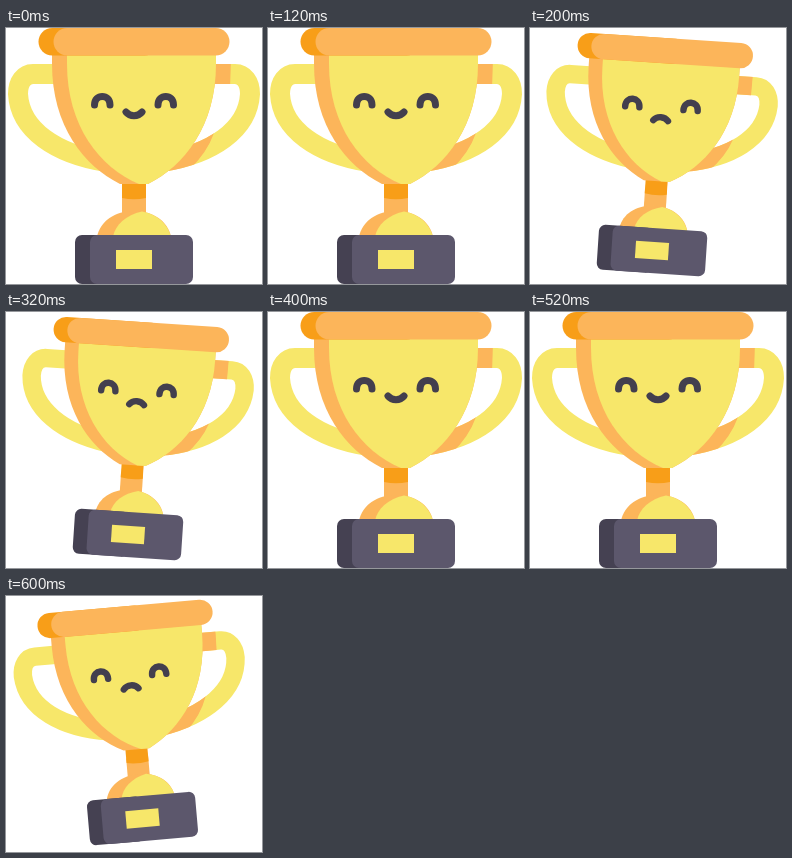
An HTML page for the animation above (0.8 s loop, 256 px wide and 256 px high).

```html
<!DOCTYPE html>
<html lang="en">
<head>
<meta charset="utf-8">
<title>Trophy</title>
<style>
  html, body { margin: 0; width: 100%; height: 100%; overflow: hidden; background: #fff; }
  svg { display: block; width: 100vw; height: 100vh; }
  .yellow { fill: #f7e76a; }
  .orange { fill: #fcb55a; }
  .amber { fill: #f89e18; }
  .slate { fill: #5c576c; }
  .dark { fill: #454152; }
  .handle { fill: none; stroke: #f7e76a; stroke-width: 20; }
  .shade { stroke: #fcb55a; }
  .face { fill: none; stroke: #433f4e; stroke-width: 7; stroke-linecap: round; stroke-linejoin: round; }
</style>
</head>
<body>
<svg viewBox="0 0 256 256">
  <defs>
    <path id="grip" d="M56 46H27C18 46 12 54 12 66C14 102 50 126 100 134"/>
    <clipPath id="joints">
      <path d="M180 30H225L224 62H180ZM140 96H208V105Q201 125 183 142L140 160Z"/>
    </clipPath>
  </defs>
  <g id="trophy">
    <use href="#grip" class="handle"/>
    <use href="#grip" class="handle" transform="matrix(-1 0 0 1 256 0)"/>
    <g clip-path="url(#joints)">
      <use href="#grip" class="handle shade" transform="matrix(-1 0 0 1 256 0)"/>
    </g>

    <path class="orange" d="M116 165H140V190H116Z"/>
    <path class="amber" d="M116 150H140V170Q128 172.5 116 170Z"/>
    <path class="orange" d="M91 209C94 193 109 183 128 183S162 193 165 209Z"/>
    <path class="yellow" d="M107 209C109 197 120 187 136 183.5C151 186 162 196 165 209Z"/>

    <path class="orange" d="M46 20V36C46 98 78 138 114 156H142C178 138 210 98 210 36V20Z"/>
    <path class="yellow" d="M61 20V36C61 98 94 140 133 156H142C178 138 210 98 210 36V20Z"/>
    <rect class="amber" x="32.5" y="0" width="120" height="27.5" rx="13.7"/>
    <rect class="orange" x="47.5" y="0" width="176" height="27.5" rx="13.7"/>

    <rect class="dark" x="69" y="207" width="60" height="49" rx="7"/>
    <rect class="slate" x="84" y="207" width="103" height="49" rx="7"/>
    <rect class="yellow" x="110" y="222" width="36" height="19"/>

    <g class="face">
      <path d="M88.5 77C88.5 65.5 104 65.5 104 77"/>
      <path d="M152 77C152 65.5 167.5 65.5 167.5 77"/>
      <path id="mouth"/>
    </g>
  </g>
</svg>
<script>
  const HOLD = 200;
  const SMILE = "M120 84C124 89 132 89 136 84";
  const FROWN = "M120 90C124 85 132 85 136 90";
  const upright = { x: 128, y: 231.5, angle: 0, scale: 1, mouth: SMILE };
  const poses = [
    upright,
    { x: 122, y: 222.5, angle: 3.8, scale: 0.92, mouth: FROWN },
    upright,
    { x: 136.5, y: 222.5, angle: -5, scale: 0.92, mouth: FROWN }
  ];
  const trophy = document.getElementById("trophy");
  const mouth = document.getElementById("mouth");

  // Each pose pivots about the centre of the base.
  function draw(time) {
    const pose = poses[Math.floor(time / HOLD) % poses.length];
    trophy.setAttribute("transform",
      `translate(${pose.x} ${pose.y}) rotate(${pose.angle}) scale(${pose.scale}) translate(-128 -231.5)`);
    mouth.setAttribute("d", pose.mouth);
  }

  let start;
  function tick(now) {
    start ??= now;
    draw(now - start);
    requestAnimationFrame(tick);
  }
  draw(0);
  requestAnimationFrame(tick);
</script>
</body>
</html>
```
